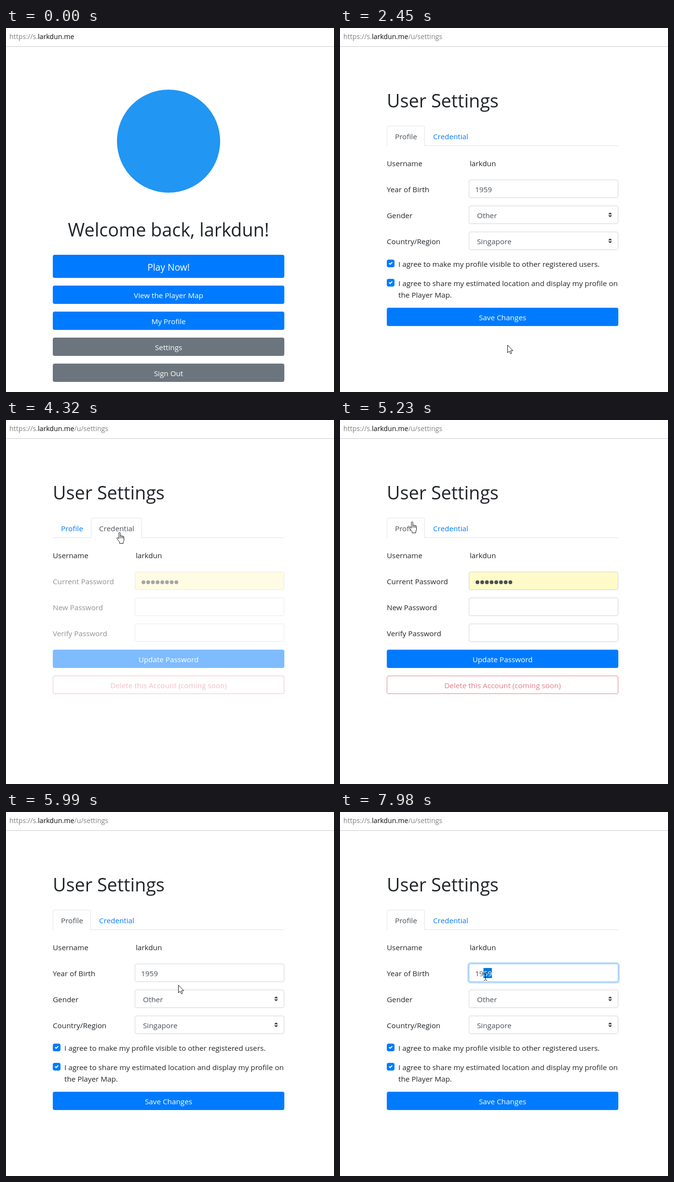
Recreate the animation shown at these times as an HTML page. Size 680 by 756 pixels, loop 8000 ms.

```html
<!DOCTYPE html>
<html lang="en">
<head>
<meta charset="utf-8">
<title>User settings</title>
<style>
  html, body { margin: 0; width: 100%; height: 100%; overflow: hidden; background: #fff; }
  svg { display: block; width: 680px; height: 756px; }
  text { font: 15.25px "Open Sans", "Noto Sans", sans-serif; fill: #212529; white-space: pre; }
  .mid { text-anchor: middle; }
  .title { font-size: 37.75px; }
  .large { font-size: 19.25px; }
  .url { font-size: 14.2px; fill: #808080; }
  .url .host { fill: #0c0c0d; }
  .light { fill: #fff; }
  .value { fill: #495057; }
  .danger { fill: #dc3545; }
  .field { fill: #fff; stroke: #ced4da; }
  .cursor { fill: #fff; stroke: #111; stroke-linejoin: round; }
</style>
</head>
<body>
<svg id="stage" viewBox="0 0 680 756"></svg>
<script>
const LOOP = 8000;
const NAME = 'larkdun';
// Normal fill, hover fill, hover border
const BLUE = ['#007bff', '#0069d9', '#0062cc'], GRAY = ['#6c757d', '#5a6268', '#545b62'];

// [x, y, width, height] of everything the pointer can touch
const homeButtons = [
  { box: [97, 471, 480, 48], label: 'Play Now!', tint: BLUE, large: true },
  { box: [97, 535, 480, 38], label: 'View the Player Map', tint: BLUE },
  { box: [97, 589, 480, 38], label: 'My Profile', tint: BLUE },
  { box: [97, 643, 480, 38], label: 'Settings', tint: GRAY },
  { box: [97, 697, 480, 38], label: 'Sign Out', tint: GRAY }
];
const saveButton = { box: [97, 581, 480, 38], label: 'Save Changes', tint: BLUE };
const updateButton = { box: [97, 477, 480, 38], label: 'Update Password', tint: BLUE };
const tabs = [
  { box: [97, 203, 79, 42], label: 'Profile', x: 114 },
  { box: [176, 203, 106, 42], label: 'Credential', x: 193 }
];
const yearBox = [267, 315, 310, 38];

const text = (x, y, s, cls = '') => `<text x="${x}" y="${y}" class="${cls}">${s}</text>`;
const rect = ([x, y, w, h], attrs = '', r = 4) =>
  `<rect x="${x}" y="${y}" width="${w}" height="${h}" rx="${r}" ${attrs}/>`;
const outline = ([x, y, w, h], attrs) => rect([x + .5, y + .5, w - 1, h - 1], attrs, 3.5);
const grow = ([x, y, w, h], d) => [x - d, y - d, w + 2 * d, h + 2 * d];

const button = ({ box, label, tint, large }) => rect(box, `fill="${tint[0]}"`) +
  outline(box, `fill="${tint[1]}" stroke="${tint[2]}" class="hover" opacity="0"`) +
  text(337, box[1] + (large ? 33 : 26), label, 'mid light' + (large ? ' large' : ''));

const field = (y, attrs = '') => outline([267, y, 310, 38], `class="field" ${attrs}`);
const select = (y, value) => field(y) + text(284, y + 26, value, 'value') +
  `<path transform="translate(556 ${y + 14}) scale(2)" d="M2 0L0 2h4zm0 5L0 3h4z" fill="#343a40"/>`;
const check = y => rect([97, y, 16, 16], 'fill="#007bff"') +
  `<path transform="translate(101 ${y + 4})" fill="#fff" d="M6.564.75l-3.59 3.612-1.538-1.55L0 4.26 2.974 7.25 8 2.193z"/>`;
const tab = t => {
  const [x, y, w] = t.box;
  return `<g class="tab"><path d="M${x + .5} 245V${y + 4.5}a4 4 0 0 1 4-4h${w - 9}a4 4 0 0 1 4 4V245" fill="#fff"/>` +
    text(t.x, 231, t.label) + '</g>';
};
const dots = Array.from({ length: 8 }, (_, i) =>
  `<circle cx="${285 + i * 9.75}" cy="337" r="3.9" fill="#495057"/>`).join('');

document.getElementById('stage').innerHTML = `
  <rect width="680" height="756" fill="#fff"/>
  <rect y="38" width="680" height="1" fill="#ccc"/>
  <text x="7" y="23" class="url">https://s.<tspan class="host">${NAME}.me</tspan><tspan id="path"></tspan></text>
  <g id="home">
    <circle cx="337" cy="235" r="107" fill="#2196f3"/>
    ${text(337, 433, `Welcome back, ${NAME}!`, 'mid title')}
    <g id="pressed" opacity="0">${rect(grow(homeButtons[3].box, 3), 'fill="#b5babe"', 7)}</g>
    ${homeButtons.map(button).join('')}
  </g>
  <g id="settings">
    ${text(97, 165, 'User Settings', 'title')}
    <rect x="97" y="244" width="480" height="1" fill="#dee2e6"/>
    ${tabs.map(tab).join('')}
    ${text(97, 287, 'Username')}${text(269, 287, NAME)}
    <g id="profile">
      ${text(97, 341, 'Year of Birth')}
      <g id="ring">${rect(grow(yearBox, 3), 'fill="#bfdeff"', 7)}</g>
      ${field(315, 'id="year"')}
      <rect id="marked" y="324" height="21" fill="#0078d7"/>
      <text x="280" y="341" class="value"><tspan id="plain"></tspan><tspan id="picked" class="light"></tspan></text>
      <rect id="caret" x="315" y="325" width="1" height="19" fill="#495057"/>
      ${text(97, 395, 'Gender')}${select(369, 'Other')}
      ${text(97, 449, 'Country/Region')}${select(423, 'Singapore')}
      ${check(481)}${text(121, 496, 'I agree to make my profile visible to other registered users.')}
      ${check(521)}${text(121, 536, 'I agree to share my estimated location and display my profile on')}
      ${text(121, 560, 'the Player Map.')}
      ${button(saveButton)}
    </g>
    <g id="credential">
      ${text(97, 341, 'Current Password')}${field(315, 'style="fill:#fffbc8"')}${dots}
      ${text(97, 395, 'New Password')}${field(369)}
      ${text(97, 449, 'Verify Password')}${field(423)}
      ${button(updateButton)}
      <g opacity=".65">${outline([97, 531, 480, 38], 'fill="none" stroke="#dc3545"')}
      ${text(337, 557, 'Delete this Account (coming soon)', 'mid danger')}</g>
    </g>
  </g>
  <g id="pointer">
    <path id="arrow" class="cursor" d="M.5 .7V16.5L4 13.2L6.6 18.6L9 17.6L6.6 12.2H11.6Z"/>
    <g id="hand" class="cursor" transform="translate(-7 -1)">
      <path d="M5 2a1.5 1.5 0 0 1 3 0V8c.3-1.2 2.6-1.2 2.8.4 .6-1.2 2.4-1 2.6.5 .6-.8 2.1-.4 2.1 1.2V16c0 2-1.5 3-1.5 5.5V23.4H6.5V21.5C6.5 19 3 17 1 13.1c-.6-1.6 1.2-2.7 2.4-1.3L5 13.6Z"/>
      <path fill="none" d="M8 8v4.5M10.8 8.6v4M13.4 9.2v3.6"/>
    </g>
    <path id="beam" d="M-3.5-7.5H-1L0-6.5L1-7.5H3.5M0-6.5V6.5M-3.5 7.5H-1L0 6.5L1 7.5H3.5" fill="none" stroke="#111"/>
  </g>`;

const $ = id => document.getElementById(id);
const show = (id, on) => { $(id).style.display = on ? '' : 'none'; };

// Pointer moves: first change, last change, number of steps, way points
const moves = [
  [370, 370, 1, [[28, 444]]],
  [460, 1100, 8, [[160, 488], [260, 550], [325, 605], [352, 641]]],
  [1190, 1640, 6, [[358, 662], [362, 677], [360, 666]]],
  [1820, 1910, 2, [[347, 658]]],
  [2950, 3680, 9, [[300, 560], [262, 350], [238, 258]]],
  [3780, 3870, 2, [[236, 240], [236, 234]]],
  [4600, 4960, 5, [[195, 225], [155, 215]]],
  [5050, 5050, 1, [[150, 212]]],
  [5770, 5990, 3, [[175, 228], [275, 295], [357, 359]]],
  [6080, 6260, 3, [[364, 412], [363, 426], [361, 385]]],
  [6440, 6890, 6, [[352, 345], [340, 337]]],
  [7270, 7270, 1, [[275, 337]]],
  [7440, 7980, 7, [[279, 338], [284, 339], [290, 340], [297, 341], [303, 342], [307, 342], [301, 342]]]
];

function along(points, p) {
  const s = p * (points.length - 1), i = Math.min(Math.floor(s), points.length - 2), f = s - i;
  return points[i].map((v, k) => Math.round(v + (points[i + 1][k] - v) * f));
}

function pointerAt(t) {
  let pos = [-50, 444];
  for (const [from, to, n, pts] of moves) {
    if (t < from) break;
    const step = to > from ? Math.floor((t - from) / (to - from) * (n - 1) + 1e-6) : 0;
    pos = along([pos, ...pts], Math.min(n, step + 1) / n);
  }
  return pos;
}

const inside = ([px, py], [x, y, w, h]) => px >= x && px < x + w && py >= y && py < y + h;

// Two-step rise used by the 150 ms transitions
const rise = (t, at) => t < at ? 0 : t < at + 90 ? .5 : 1;

const hoverRects = document.querySelectorAll('.hover');
const allButtons = [...homeButtons, saveButton, updateButton];
const tabNodes = document.querySelectorAll('.tab');

function panes(t) {
  const back = t >= 5410, at = back ? 5410 : 4230;
  if (t < at) return { profile: !back && t < 4230, opacity: 1, ...(t >= 4410 && { profile: false }) };
  const age = t - at, swapped = age >= 90;
  return { profile: back === swapped, opacity: age < 180 ? .5 : 1 };
}

function draw(t) {
  const home = t < 2360, pos = pointerAt(t), before = pointerAt(t - 90);
  const { profile, opacity } = panes(t);

  show('home', home);
  show('settings', !home);
  $('path').textContent = home ? '' : '/u/settings';
  $('pressed').setAttribute('opacity', rise(t, 2090));

  allButtons.forEach((b, i) => hoverRects[i].setAttribute('opacity',
    (inside(pos, b.box) + inside(before, b.box)) / 2));

  const active = t >= 4050 && t < 5230 ? 1 : 0;
  tabs.forEach((b, i) => {
    const [edge, label] = tabNodes[i].children, over = inside(pos, b.box);
    edge.setAttribute('stroke', i === active ? '#dee2e6' : '#e9ecef');
    edge.style.display = i === active || over ? '' : 'none';
    edge.setAttribute('d', edge.getAttribute('d').replace(/24[45]/g, i === active ? 245 : 244));
    label.style.fill = i === active ? '#495057' : over ? '#0056b3' : '#007bff';
  });

  show('profile', profile);
  show('credential', !profile);
  $('profile').style.opacity = $('credential').style.opacity = opacity;

  const focus = rise(t, 7000);
  $('ring').setAttribute('opacity', focus);
  $('year').style.stroke = focus ? '#80bdff' : '';
  const digit = 8.72, drag = t >= 7270;
  const start = drag ? Math.max(0, Math.min(4, Math.round((pos[0] - 280) / digit))) : 4;
  $('plain').textContent = '1959'.slice(0, start);
  $('picked').textContent = '1959'.slice(start);
  $('marked').setAttribute('x', 280 + start * digit);
  $('marked').setAttribute('width', (4 - start) * digit);
  show('caret', focus && !drag);

  const links = home ? homeButtons : [...tabs, profile ? saveButton : updateButton];
  const hand = links.some(b => inside(pos, b.box)) || (t >= 2360 && t < 2450);
  const beam = !home && !hand && inside(pos, yearBox);
  show('pointer', t >= 370);
  show('hand', hand);
  show('beam', beam);
  show('arrow', !hand && !beam);
  $('pointer').setAttribute('transform', `translate(${pos[0] + (beam ? .5 : 0)} ${pos[1]})`);
}

const begin = performance.now();
function tick() {
  draw((performance.now() - begin) % LOOP);
  requestAnimationFrame(tick);
}
tick();
</script>
</body>
</html>
```
